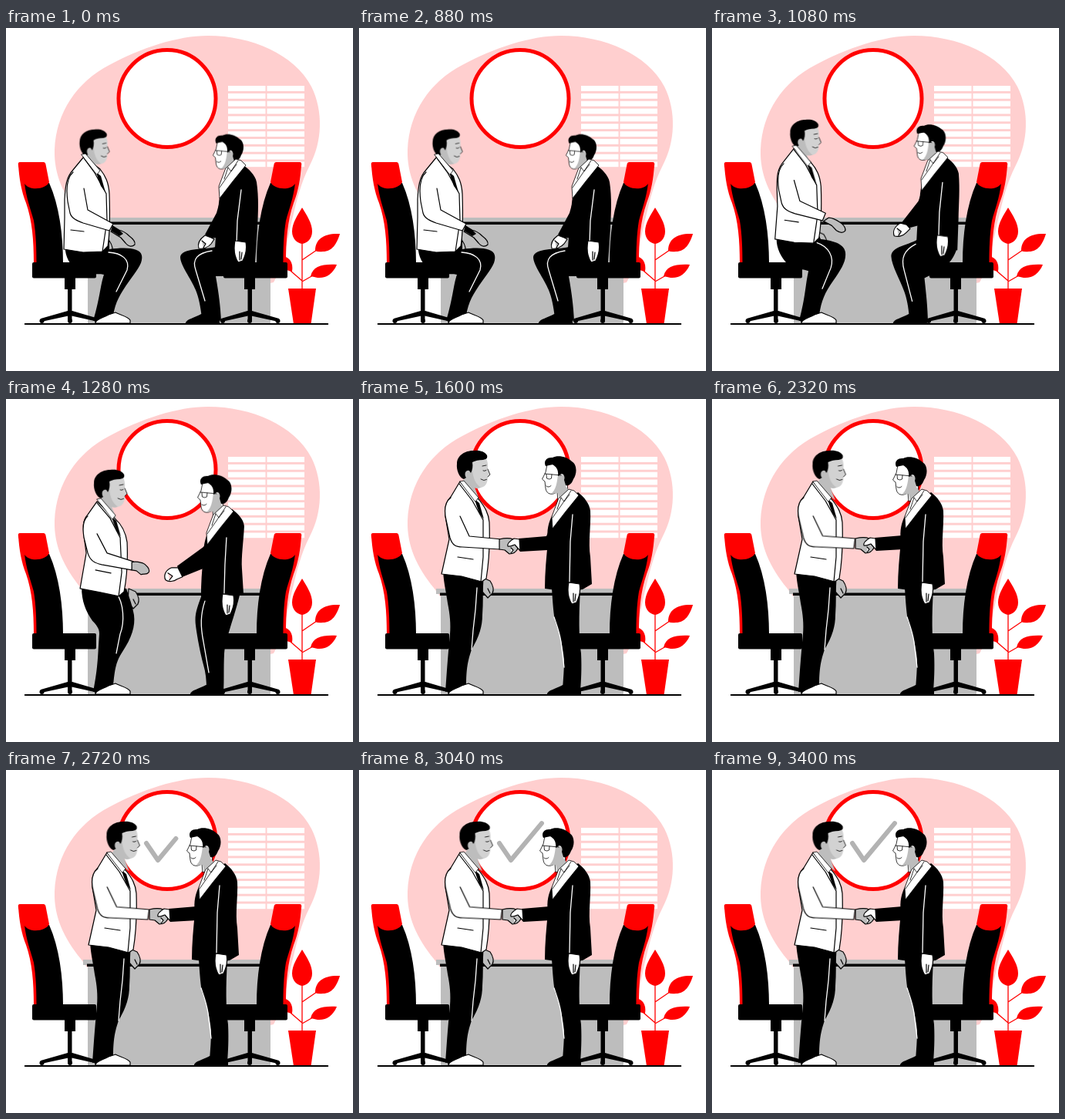
Recreate the animation shown at these times as an HTML page. Size 450 px wide and 445 px high, loop 3.96 s.

```html
<!DOCTYPE html>
<html lang="en">
<head>
<meta charset="utf-8">
<title>Handshake</title>
<style>
html, body { margin: 0; width: 100%; height: 100%; overflow: hidden; background: #fff; }
svg { display: block; width: 100%; height: 100%; }
.red { fill: #f00; }
.grey { fill: #bdbdbd; }
.pale { fill: #d2d2d2; }
.white { fill: #fff; }
.ink { stroke: #000; stroke-width: 1.2; stroke-linejoin: round; stroke-linecap: round; }
.fine { stroke-width: .8; }
.line { fill: none; }
.chalk { fill: none; stroke: #fff; stroke-width: 1.3; stroke-linecap: round; }
.stem { fill: none; stroke: #f00; stroke-width: 1.3; }

/* Each part carries its seated (--s), rising (--m) and standing (--t) state. */
.morph { d: var(--t); animation: morph 3960ms infinite; }
.move { animation: move 3960ms infinite; }
@keyframes morph {
  0%, 22.22% { d: var(--s); animation-timing-function: ease-in; }
  32.32% { d: var(--m); animation-timing-function: ease-out; }
  40.4%, 100% { d: var(--t); }
}
@keyframes move {
  0%, 22.22% { transform: var(--s); animation-timing-function: ease-in; }
  32.32% { transform: var(--m); animation-timing-function: ease-out; }
  40.4%, 100% { transform: var(--t, none); }
}

.lean { animation: lean 3960ms infinite ease-in-out; }
@keyframes lean {
  0%, 48.48% { transform: none; }
  58.59%, 100% { transform: var(--to); }
}
.shake { animation: shake 3960ms infinite ease-in-out; }
@keyframes shake {
  0%, 48.48% { transform: none; }
  51% { transform: translate(2px, -3px); }
  53.5% { transform: translate(2px, 2px); }
  56% { transform: translate(3px, -3px); }
  58.59%, 100% { transform: translate(4px, -1px); }
}
.swing { transform-origin: 116px 140px; animation: swing 3960ms infinite ease-in-out; }
@keyframes swing {
  0%, 48.48% { transform: none; }
  51% { transform: rotate(-2deg); }
  53.5% { transform: rotate(1.4deg); }
  56% { transform: rotate(-2deg); }
  58.59%, 100% { transform: rotate(-.8deg); }
}
.watch { animation: watch 3960ms infinite; }
@keyframes watch {
  0%, 22.22% { opacity: 1; }
  25%, 100% { opacity: 0; }
}
.tick { fill: none; stroke: #b3b3b3; stroke-width: 6; stroke-linecap: round; stroke-linejoin: round;
  stroke-dasharray: 89 200; animation: tick 3960ms infinite; }
@keyframes tick {
  0%, 62.63% { stroke-dashoffset: 93; }
  68.69% { stroke-dashoffset: 26; animation-timing-function: ease-out; }
  75.76%, 100% { stroke-dashoffset: 0; }
}
</style>
</head>
<body>
<svg viewBox="0 0 450 445">
  <defs>
    <g id="chair">
      <path class="red" d="M16 177C17 195 20 212 26 227C34 250 36 275 36 305H45V200L30 180Z"/>
      <path d="M24 201C26 220 32 235 36 250C39 268 39.500 288 39.500 305H74C74 268 69 230 56 201Z"/>
      <path class="red" d="M18 174H48.500Q51 174 51.500 177L56 200C52 209 31 212 24 202L16 179Q15 174 18 174Z"/>
      <rect x="34" y="304" width="83" height="20.500" rx="2"/>
      <rect x="76" y="324" width="14" height="15"/>
      <rect x="80" y="338" width="5.500" height="42"/>
      <path d="M45 377L80 367H86L120 377L119 381L83 373L46 381Z"/>
      <g><circle cx="46.500" cy="380" r="3"/><circle cx="83" cy="380" r="3"/><circle cx="118" cy="380" r="3"/></g>
    </g>
    <pattern id="slats" x="288" y="75" width="50.500" height="9.850" patternUnits="userSpaceOnUse">
      <rect class="white" width="48.500" height="6.900"/>
    </pattern>
  </defs>

  <!-- Room -->
  <path fill="#ffcfcf" d="M262 10C318 10 374 34 396 76C412 108 410 148 394 178C382 202 378 220 372 245C364 275 362 305 347 330C290 345 190 320 130 283C112 268 105 255 97 245C75 218 62 190 63 158C65 109 92 70 134 48C175 26 222 10 262 10Z"/>
  <rect x="288" y="75" width="99" height="105.500" fill="url(#slats)"/>
  <circle cx="209" cy="91.500" r="63" fill="#fff" stroke="#f00" stroke-width="5"/>
  <path class="tick" d="M182 95L197 117L237 69"/>
  <rect class="grey" x="100" y="246" width="230" height="7"/>
  <rect class="grey" x="106" y="253" width="237" height="131"/>
  <rect x="105" y="251.500" width="238" height="3.500"/>

  <!-- Plant -->
  <path class="stem" d="M384 275V339M384 301L403 288M384 329L398 321M384 328L369 315"/>
  <path class="red" d="M384 233C390 243 397 253 397 264C397 274 390 279 384 280C378 279 371 274 371 264C371 253 378 243 384 233Z"/>
  <path class="red" d="M433 267C429 280 423 290 411 290Q405 291 401 289C401 274 412 266 433 267Z"/>
  <path class="red" d="M429 307C424 319 415 325 404 324L395 322C398 309 410 306 429 307Z"/>
  <path class="red" d="M355 295C367 296 373 303 371 316C362 315 356 308 355 295Z"/>
  <path class="red" d="M366 338H402L395.500 384H373Z"/>

  <use href="#chair"/>
  <use href="#chair" transform="translate(399) scale(-1 1)"/>
  <rect x="24" y="383" width="394" height="2"/>

  <!-- Right man -->
  <path class="move" style="--s:translate(-11px,0);--m:translate(-5px,0)" d="M244 384C243 378 256 376 264 371L288 376V384Z"/>
  <path class="morph" style="
    --s:path('M272 284C255 288 228 285 226 297C226 308 240 325 246 340C250 350 252 360 254 376L279 380C278 360 276 345 272 322C290 322 315 322 323 305L300 280Z');
    --m:path('M254 254C248 270 244 280 246 294C248 310 252 330 256 345C259 355 260 365 260 376L282 380C283 365 282 350 283 330C285 310 294 290 303 255L275 245Z');
    --t:path('M250 245C251 262 252 275 254 288C260 302 264 320 266 338C266 350 265 362 264 376L287 380C288 365 289 350 288 330C285 310 285 280 287 247L270 240Z')"/>
  <path class="chalk morph" style="
    --s:path('M267 289C248 292 241 300 246 314L258 354');
    --m:path('M258 262C252 280 252 295 256 315L263 355');
    --t:path('M253 283C256 292 260 302 262 315L266 348')"/>
  <g class="shake">
    <path class="morph" style="
      --s:path('M280 215L288 270L266 273L258 268L273 240Z');
      --m:path('M262 185L268 215L229 231L222 217L256 192Z');
      --t:path('M252 158L262 195L209 198L207 181L243 178Z')"/>
  </g>
  <g class="lean" style="--to:translate(-3px,1px)">
    <g class="move" style="transform-origin:261px 94px;--s:translate(28.500px,62px) scale(.9,.92);--m:translate(11px,24px)">
      <path class="white ink fine" d="M244 85L242 95L237.500 104L241 107L242 116C243 122 247 124 252 123L257 121L258 132L271 124L270 105L258 85Z"/>
      <path class="grey" d="M258 97L266 99L268 113L273 120L260 132L258 122L249 123C255 118 257 110 258 97Z"/>
      <path d="M242 87C239 81 243 75 251 76C258 72 270 75 276 81C283 85 283 97 278 104C276 110 272 113 268 112L266 105C268 98 263 95 260 99L258 100C259 92 256 88 251 85Z"/>
      <path class="line ink fine" d="M241 97L262 99M243 97.500L243.500 103Q247 105 249.500 103L250 98M243 113Q246 115.500 249 112.500"/>
    </g>
  </g>
  <path class="morph" style="
    --s:path('M306 177C314 182 323 190 325 200C328 220 327 240 326 260L323 305L305 308L288 296L271 285C272 270 273 255 275 240C276 225 277 215 280 205L294 186Z');
    --m:path('M293 143C301 149 308 156 309 165C308 185 305 205 306 220L308 252L297 257L277 260L253 256C253 240 254 222 256 205C256 192 258 182 262 173L280 152Z');
    --t:path('M284 121C292 127 299 136 300 145C301 165 297 185 300 205L302 240L290 247L270 250L241 246C241 225 243 205 245 185C243 170 246 160 250 152L268 130Z')"/>
  <g class="move" style="--s:translate(26px,53px);--m:translate(10px,21px)">
    <path class="white ink fine" d="M259 129L272 117L279 119L285 125L268 146L251 168L250 153Z"/>
    <path class="line ink fine" d="M262 128L257 143M275 119L263 137L251 154M262 128L266 133L273 124"/>
  </g>
  <path class="chalk morph" style="
    --s:path('M305 210L300 250L299 280');
    --m:path('M286 180L284 215L283 252');
    --t:path('M277 150L274 185L273 237')"/>
  <path class="white ink move" style="--s:translate(25px,38px);--m:translate(9px,15px)" d="M272 238L286 240C288 250 285 258 282 264L276 266C271 258 270 248 272 238ZM278 252V263M281 253L280 262"/>

  <!-- Left man -->
  <path class="grey ink move" style="--s:translate(-36px,40px);--m:translate(-2px,14px)" d="M161 232L170 236C174 242 175 248 173 252L167 258L160 250ZM167 246L170 252"/>
  <path class="morph" style="
    --s:path('M78 277C74 290 80 305 92 315C105 322 118 318 127 320C122 335 122 350 113 380L139 373C142 355 148 345 160 328C170 314 178 305 176 295C174 285 155 284 134 287L134 262Z');
    --m:path('M98 245C98 262 103 275 112 288C120 296 121 300 121 305C119 330 120 345 113 380L139 373C141 350 143 340 151 328C163 310 168 295 166 280C164 268 160 258 156 246L130 240Z');
    --t:path('M109 223C110 240 113 250 115 265C118 280 119 292 118 305C116 325 114 350 112 380L139 373C139 350 141 340 146 325C156 308 160 295 160 280C161 265 161 250 160 236L135 225Z')"/>
  <path class="chalk morph" style="
    --s:path('M133 291C150 292 161 300 157 314L143 342');
    --m:path('M143 252C153 265 154 290 148 305L143 330');
    --t:path('M153 245C152 265 150 285 148 300L146 325')"/>
  <path class="white ink" d="M116 383C116 378 126 376 133 372L142 369C147 372 158 374 161 379V383Z"/>
  <g class="lean" style="--to:translate(3.500px,0)">
    <g class="move" style="transform-origin:147px 90px;--s:translate(-33.500px,63px) scale(.9,.93);--m:translate(-13px,25px)">
      <path class="pale" d="M145 82C152 78 160 79 165 77C168 84 167 88 167 91L170 98L167 101C167 107 165 114 158 115C154 116 152 116 150 115L156 131L131 110L137 104C134 100 136 92 142 92Z"/>
      <path class="grey" d="M139 92H147C148 103 151 110 158 115C154 116 152 116 150 115L156 131L131 110L137 104Z"/>
      <path d="M136 104C130 102 126 92 127 84C127 73 138 67 148 67C156 66 163 68 166 73C167 77 165 78 161 79C155 79 151 80 147 82C148 88 147 92 145 96L143 93C138 91 136 98 139 102Z"/>
      <path class="line ink fine" d="M160 87L165 86M161 93Q163 94 165 92.500M158 104Q162 107 165.500 104.500M167 91L170 98L167 101"/>
    </g>
  </g>
  <path class="white ink morph" style="
    --s:path('M101 167L87 184C78 194 77 205 76 222L76 246L75 287L100 291L125 290L132 283C135 265 135 245 134 215C133 200 129 192 122 183Z');
    --m:path('M118 133L106 150C99 158 99 165 102 185L104 200L96 246L122 251L146 256L153 250C156 235 158 210 157 186C155 172 150 163 141 155Z');
    --t:path('M131 107L119 127C111 135 110 145 113 158L117 182L107 227L133 230L159 237L165 233C168 215 170 190 169 160C168 148 163 140 156 131Z')"/>
  <path class="line ink morph" style="
    --s:path('M101 169L115 188L130 215L131 250L125 290M84 262L101 264');
    --m:path('M118 135L135 155L148 180L150 225L146 256M116 222L136 226');
    --t:path('M130 110L147 132L161 157L161 205L158 237M128 205L148 208')"/>
  <g class="move" style="--s:translate(-33px,57px);--m:translate(-13px,23px)">
    <path d="M150 130L156 135L162 156L156 148L152 137Z"/>
    <path class="white ink fine" d="M131 107L136 106L155 128L151 133Z"/>
  </g>
  <g class="swing">
    <path class="white ink morph" style="
      --s:path('M87 187C78 195 78 210 80 225L83 240C85 247 92 250 100 253L134 263L139 254L106 236L101 208');
      --m:path('M106 152C99 158 99 168 101 180L106 200C109 210 115 213 124 215L163 222L165 211L131 200L118 175');
      --t:path('M119 128C111 134 110 144 113 157L118 180C121 190 126 192 134 192L183 195L185 182L143 178L131 152')"/>
  </g>

  <!-- Hands that meet -->
  <g class="shake">
    <path class="grey ink morph" style="
      --s:path('M146 262C152 263 157 267 160 270C164 273 168 277 167 281C163 285 158 283 155 279L149 272L136 264Z');
      --m:path('M163 212C168 210 173 212 177 213C182 215 187 221 185 225C182 229 178 226 175 228L169 223L163 222Z');
      --t:path('M182 182C190 180 195 180 200 182C206 184 208 190 206 194C203 200 199 201 195 201L189 196L182 195Z')"/>
    <path class="white ink morph" style="
      --s:path('M266 272L258 269C251 274 248 280 250 286C255 287 262 285 266 280L270 274ZM254 276L259 280L256 285');
      --m:path('M223 219L215 219C207 222 204 229 207 235C211 238 218 237 222 234L229 231ZM210 226L216 230L212 235');
      --t:path('M208 182L201 181C196 184 192 188 193 191C196 192 199 190 202 189L209 197ZM197 193L200 196L197 200')"/>
  </g>
  <path class="watch" d="M138 256L146 261L152 267L147 270L136 263Z"/>
</svg>
</body>
</html>
```
